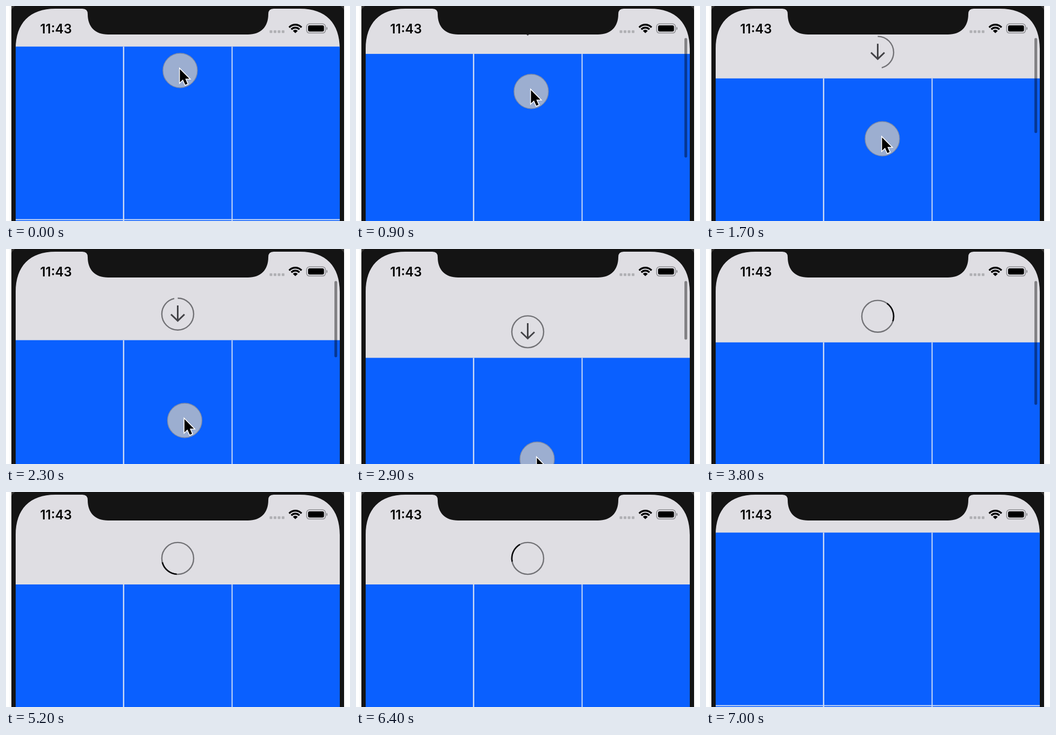
Recreate the animation shown at these times as an HTML page with a canvas. Size 640x400 px, loop 7100 ms.

```html
<!DOCTYPE html>
<html lang="en">
<head>
<meta charset="utf-8">
<title>Pull to refresh</title>
<style>
  html, body { margin: 0; width: 100%; height: 100%; overflow: hidden; background: #fff; }
  canvas { display: block; width: 640px; height: 400px; }
</style>
</head>
<body>
<canvas id="stage" width="640" height="400"></canvas>
<script>
const ctx = document.getElementById('stage').getContext('2d');

const LOOP = 7100, STEP = 100;
const RELEASE = 3250, DISMISS = 6450, DISMISS_TIME = 450;
const GRID_TOP = 75.5, REFRESH_HEIGHT = 96.5;
const ICON_X = 319.5, ICON_R = 29.6;
const PAPER = '#dfdee3', BLUE = '#0a60ff', RULE = '#d0dcf4', BEZEL = '#141414';

// Finger path: time, x, y
const FINGER = [
  [0, 324, 120], [400, 324, 120], [900, 326, 159],
  [1700, 328, 247], [2900, 337, 391], [3200, 338, 414]
];

const clamp = v => Math.min(1, Math.max(0, v));
const smooth = v => v * v * (3 - 2 * v);
const ramp = (t, start, length) => clamp((t - start) / length);

function fingerAt(t) {
  let i = 1;
  while (i < FINGER.length - 1 && t > FINGER[i][0]) i++;
  const a = FINGER[i - 1], b = FINGER[i];
  const k = ramp(t, a[0], b[0] - a[0]);
  return { x: a[1] + (b[1] - a[1]) * k, y: a[2] + (b[2] - a[2]) * k };
}

// Rubber-band resistance after a small dead zone
function pullAt(t) {
  const drag = Math.max(0, fingerAt(t).y - FINGER[0][2] - 14) * 0.55;
  return drag / (1 + drag / 1250);
}

function offsetAt(t) {
  if (t < RELEASE) return pullAt(t);
  if (t >= DISMISS) return REFRESH_HEIGHT * (1 - smooth(ramp(t, DISMISS, DISMISS_TIME)));
  const w = 9 * (t - RELEASE) / 1000;
  return REFRESH_HEIGHT + (pullAt(RELEASE) - REFRESH_HEIGHT) * (1 + w) * Math.exp(-w);
}

function rect(x, y, w, h, color) {
  ctx.fillStyle = color;
  ctx.fillRect(x, y, w, h);
}

function pill(x, y, w, h, r, color) {
  ctx.beginPath();
  ctx.roundRect(x, y, w, h, r);
  ctx.fillStyle = color;
  ctx.fill();
}

function stroke(width, color) {
  ctx.lineWidth = width;
  ctx.strokeStyle = color;
  ctx.stroke();
}

// Angles in degrees, clockwise from the top
function ring(y, from, to, width, color) {
  const rad = d => (d - 90) * Math.PI / 180;
  ctx.beginPath();
  ctx.arc(ICON_X, y, ICON_R, rad(from), rad(to));
  stroke(width, color);
}

const screenPath = new Path2D(
  'M18 420V80C18 32 44 5 92 5H142Q152 5 152 15C152 39 166 53 190 53' +
  'H450C474 53 488 39 488 15Q488 5 498 5H547C595 5 621 32 621 80V420Z');
const cursorPath = new Path2D('M0 0V24.5L5.6 19.2L10 29L14.2 27.2L10 17.8H17.6Z');

function drawBezel() {
  rect(0, 0, 640, 400, '#fff');
  rect(10, 0, 619, 400, BEZEL);
  ctx.fillStyle = '#3b3938';
  ctx.fill(new Path2D('M10 0H17Q12 3 10 8ZM629 0H622Q627 3 629 8Z'));
}

function drawGrid(top) {
  rect(18, top, 603, 400 - top, BLUE);
  rect(217.6, top, 2.4, 400 - top, RULE);
  rect(419.6, top, 2, 400 - top, RULE);
  rect(18, top + 321, 603, 2, RULE);
}

function drawArrow(y) {
  ctx.beginPath();
  ctx.moveTo(ICON_X, y - 16);
  ctx.lineTo(ICON_X, y + 12);
  ctx.moveTo(ICON_X - 12.5, y + 0.5);
  ctx.lineTo(ICON_X, y + 12.5);
  ctx.lineTo(ICON_X + 12.5, y + 0.5);
  stroke(3, '#434347');
}

function drawIndicator(t, offset) {
  const y = GRID_TOP + offset - 48.5;
  const gray = '#727276';
  if (t < RELEASE) {
    const progress = clamp((offset - 27.5) / (REFRESH_HEIGHT - 27.5));
    if (progress > 0) ring(y, 0, 360 * progress, 2.4, gray);
    if (offset > 0) drawArrow(y);
    return;
  }
  ctx.globalAlpha = 1 - ramp(t, DISMISS, DISMISS_TIME * 0.8);
  ring(y, 0, 360, 2.4, gray);
  if (t < DISMISS + DISMISS_TIME) {
    const start = 36 + (t - 3800) * 0.3625;
    ring(y, start, start + 72, 2.6, '#08080a');
  }
  ctx.globalAlpha = 1 - ramp(t, RELEASE, 200);
  if (ctx.globalAlpha > 0) drawArrow(y);
  ctx.globalAlpha = 1;
}

function drawScrollBar(t, offset) {
  const visible = ramp(t, 550, 150) * (1 - ramp(t, 4200, 350));
  if (!visible) return;
  const length = t < RELEASE ? 236 - offset : 232 - (offset - REFRESH_HEIGHT);
  pill(611, 59.5, 5.2, length, 2.6, `rgba(0,0,0,${0.42 * visible})`);
}

function drawStatus() {
  ctx.fillStyle = '#050505';
  ctx.font = '600 24px Inter, "Liberation Sans", sans-serif';
  ctx.textAlign = 'center';
  ctx.fillText('11:43', 93, 50.5);

  for (let i = 0; i < 4; i++) pill(490.5 + i * 7.5, 45.3, 5, 5, 1, '#b0b0b4');

  // Wi-Fi fan
  const x = 538.3, y = 50.5, spread = 0.82;
  for (const [radius, width] of [[15.7, 3.4], [10.2, 3.4]]) {
    ctx.beginPath();
    ctx.arc(x, y, radius, -Math.PI / 2 - spread, -Math.PI / 2 + spread);
    stroke(width, '#000');
  }
  ctx.beginPath();
  ctx.moveTo(x, y);
  ctx.arc(x, y, 6.2, -Math.PI / 2 - spread, -Math.PI / 2 + spread);
  ctx.fillStyle = '#000';
  ctx.fill();

  ctx.beginPath();
  ctx.roundRect(559.3, 33.3, 35, 17, 5);
  stroke(1.6, '#8d8d91');
  pill(562, 36, 29.6, 11.6, 3, '#000');
  pill(596, 39, 2, 5.6, [0, 2, 2, 0], '#8d8d91');
}

function drawFinger(t) {
  if (t >= RELEASE) return;
  const { x, y } = fingerAt(t);
  ctx.beginPath();
  ctx.arc(x, y, 32, 0, 2 * Math.PI);
  ctx.fillStyle = '#9caed0';
  ctx.fill();
  stroke(1.4, '#7f8ba6');

  ctx.save();
  ctx.translate(x - 0.5, y - 2.5);
  ctx.lineJoin = 'miter';
  ctx.lineWidth = 3;
  ctx.strokeStyle = '#fff';
  ctx.stroke(cursorPath);
  ctx.fillStyle = '#000';
  ctx.fill(cursorPath);
  ctx.restore();
}

function draw(t) {
  const offset = offsetAt(t);
  drawBezel();
  ctx.save();
  ctx.clip(screenPath);
  rect(18, 5, 603, 395, PAPER);
  drawIndicator(t, offset);
  drawGrid(GRID_TOP + offset);
  drawScrollBar(t, offset);
  drawStatus();
  ctx.restore();
  drawFinger(t);
}

const begin = performance.now();
function tick() {
  const t = (performance.now() - begin) % LOOP;
  draw(Math.floor(t / STEP) * STEP);
  requestAnimationFrame(tick);
}
tick();
</script>
</body>
</html>
```
